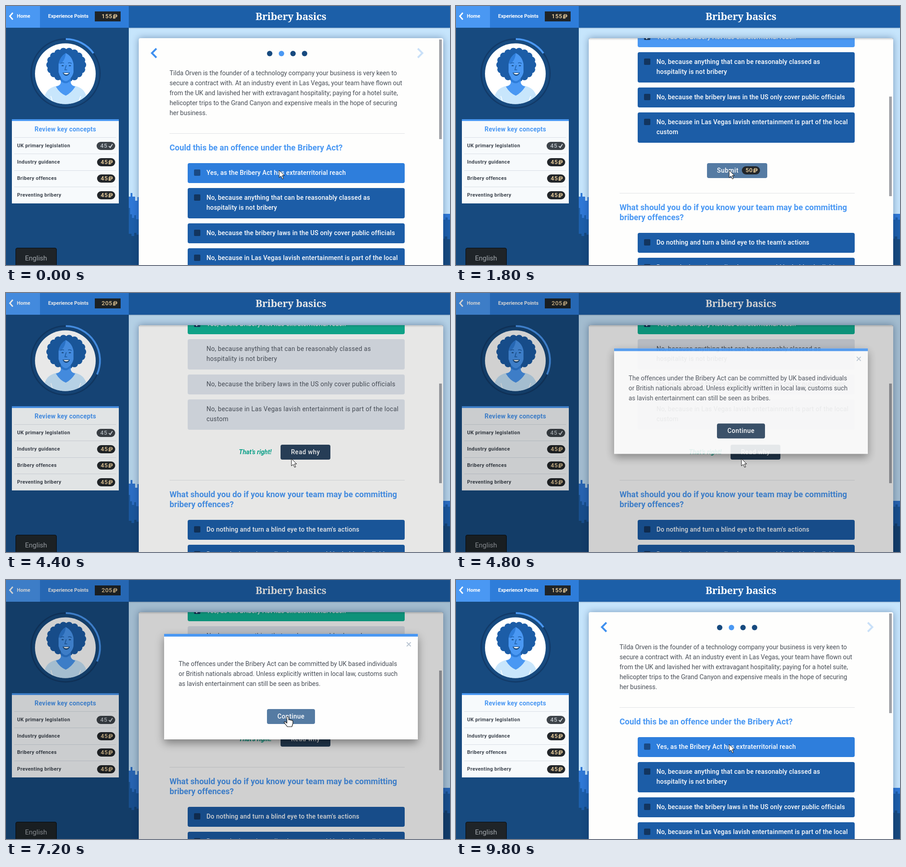
Write an HTML page that moves like this. It is 980x572 px and loops after 10 s.

```html
<!DOCTYPE html>
<html lang="en">
<head>
<meta charset="utf-8">
<title>Bribery basics</title>
<style>
html, body { margin: 0; width: 100%; height: 100%; overflow: hidden; }
#stage { position: relative; width: 980px; height: 572px; overflow: hidden; background: #c6e5fc;
  font: 14px/22px Roboto, sans-serif; color: #484e57; }
#stage div, #stage svg { position: absolute; box-sizing: border-box; }
.t { white-space: pre; }
.b { font-weight: 700; }
.mid { text-align: center; }
.small { font-size: 11px; font-weight: 700; color: #fff; }
.row { font-size: 11px; font-weight: 700; letter-spacing: .35px; color: #3c434d; }
.head { font-size: 18px; font-weight: 700; color: #4a98f3; }
.coin { color: #f8d9a4; font: 500 13px/18px Roboto, sans-serif; letter-spacing: .5px; white-space: pre; }
.pill { width: 40px; height: 18px; border-radius: 9px; background: #22262a; padding-left: 8px; }
#stage .coin svg { position: static; vertical-align: -1px; margin-left: 1px; }
.opt { left: 401px; width: 479px; border-radius: 4px; background: #1c5da7; color: #fff;
  font-weight: 500; letter-spacing: .2px; padding: 10px 0 0 41.5px; white-space: pre; }
.box { left: 14px; top: 14px; width: 14px; height: 14px; border-radius: 2px; background: #12355f; }
.off { font-weight: 400; letter-spacing: .28px; color: #4b525c; }
.off .box { display: none; }
.btn { height: 33px; border-radius: 4px; background: #2a435e; color: #fff;
  font: 500 14px/33px Roboto, sans-serif; letter-spacing: .5px; white-space: pre; }
.line { left: 361px; width: 519px; height: 1px; background: #e0e2e5; }
</style>
</head>
<body>
<div id="stage">
  <svg width="980" height="572">
    <path id="far" fill="#3079d7" d="M271 421h4v-8h4v8h6v9h5v-8h5V572H271zM960 462h5v-3h15V572H960z"/>
    <path id="near" fill="#1d5fab" d="M271 446h3v14h4v8h5v-6h4v9h8V572H271zM960 472h10v-5h5v5h5V572H960z"/>
    <path id="base" fill="#174a7f" d="M271 503h6v5h6v-7h5v4h7V572H271zM960 514h8v-5h6v6h6V572H960z"/>
  </svg>

  <div style="left:293px;top:71px;width:672px;height:520px;border-radius:4px;background:#fefefd;box-shadow:0 0 16px rgba(10,40,90,.42)"></div>
  <div style="left:293px;top:71px;width:672px;height:501px;overflow:hidden">
    <div id="page" style="left:-293px;top:-71px;width:980px;height:1000px">
      <svg id="nav" width="980" height="130" fill="none" stroke-width="4"></svg>
      <div class="line" style="top:281px"></div>
      <div class="line" style="top:713px"></div>
      <div id="submit" class="btn" style="left:554px;top:647px;width:133px;padding-left:22px">Submit</div>
      <div id="reply" style="left:0;top:635px">
        <div class="t b" style="left:514px;top:5px;font-style:italic;color:#0fb096">That’s right!</div>
        <div id="why" class="btn mid" style="left:606px;width:110px">Read why</div>
      </div>
    </div>
    <div id="edge" style="width:672px;height:5px;background:linear-gradient(rgba(40,50,60,.2),transparent)"></div>
    <div id="bar" style="left:663px;top:3px;width:6px;height:220px;background:#a2a4a9"></div>
  </div>

  <div style="left:271px;width:709px;height:48px;background:#1c5fa8;box-shadow:0 1px 2px rgba(0,30,70,.3)"></div>
  <div class="mid" style="left:271px;top:0;width:716px;color:#fff;font:700 22px/45px 'Noto Serif',serif;letter-spacing:-.2px">Bribery basics</div>

  <div id="side" style="width:271px;height:572px;background:#174a7f">
    <div style="width:271px;height:48px;background:#2e7dda"></div>
    <div style="width:75px;height:48px;background:#4a98f3"></div>
    <svg width="20" height="48" fill="none" stroke="#fff" stroke-width="3"><path d="M15 15L8.500 22.500L15 30"/></svg>
    <div style="left:196px;top:12px;width:57px;height:22px;background:#1f2428"></div>
    <div id="points" class="coin" style="left:211px;top:14px"></div>
    <svg id="avatar" width="271" height="240">
      <clipPath id="disc"><circle cx="131" cy="149.500" r="67"/></clipPath>
      <circle cx="131.500" cy="149" r="76" fill="none" stroke="#123a68" stroke-width="3"/>
      <path id="arc" fill="none" stroke="#4a98f3" stroke-width="4"/>
      <circle cx="131" cy="149.500" r="67" fill="#fff"/>
      <g clip-path="url(#disc)">
        <g id="hair" fill="#1c5da7"><ellipse cx="133" cy="129" rx="38" ry="34"/></g>
        <path fill="#c8e6fc" d="M81 222C84 190 92 181 113 176H151C171 181 178 190 182 222z"/>
        <path fill="#4a98f3" d="M121 152V170Q119 176 110 178Q119 193 132 198Q144 192 153 178Q145 176 143 170V152z"/>
        <path fill="#2e7dda" d="M121 158Q132 174 143 158V164Q133 176 121 166z"/>
        <path fill="#4a98f3" d="M132 104Q119 112 116 128V146Q119 160 132 166Q146 161 149 146V128Q146 111 132 104z"/>
        <path fill="#2e7dda" d="M132 104Q119 112 116 128Q130 125 132 104z"/>
        <path fill="none" stroke="#1c5da7" stroke-width="1.500" d="M120 127q4-3 8-1M137 126q4-2 8 1M133 131l-3 10h5"/>
        <path fill="#174a7f" d="M122 132q3-3 6 0q-3 2-6 0zM138 132q3-3 6 0q-3 2-6 0zM125 147h16q-2 7-8 7t-8-7z"/>
        <path fill="#fff" d="M127 148h12q-2 3-6 3t-6-3z"/>
        <path fill="none" stroke="#fff" stroke-width="1.500" d="M99 199l4 13M165 199l-5 13"/>
      </g>
    </svg>
    <div style="left:13px;top:250px;width:236px;height:186px;background:#f7fafc;border-top:4px solid #4a98f3"></div>
    <div style="left:21px;top:534px;width:91px;height:44px;border:1px solid #060a0e;border-radius:4px;background:#1f2428"></div>
  </div>

  <div id="dim" style="width:980px;height:572px;background:#000"></div>
  <div id="modal" style="left:349px;top:119px;width:560px;height:233px;background:#fefefe;box-shadow:0 8px 18px rgba(0,0,0,.4)">
    <div style="width:560px;height:6px;background:#4a98f3"></div>
    <svg width="560" height="40" stroke="#b9c5d2" stroke-width="2"><path d="M535.500 18.500l9 9m0-9l-9 9"/></svg>
    <div class="t" style="left:32px;top:55px">The offences under the Bribery Act can be committed by UK based individuals
or British nationals abroad. Unless explicitly written in local law, customs such
as lavish entertainment can still be seen as bribes.</div>
    <div id="go" class="btn mid" style="left:227px;top:166px;width:106px">Continue</div>
  </div>
  <div id="flyer" class="coin pill"></div>
  <svg id="cursor" width="24" height="28" style="overflow:visible" stroke="#111" stroke-linejoin="round" fill="#fff">
    <path id="arrow" d="M0 0V16L4 12.500L7 19L9.500 18L6.700 11.500H11.500z"/>
    <path id="hand" stroke-width="1.200" d="M0 2q2-3 4 0v6q2-1.500 3.500 .5q2-1 3.300 .7q2.400-.5 2.400 2V16L11 23H1L-6 14q0-3 3-1.500L0 15z"/>
  </svg>
</div>
<script>
const $ = id => document.getElementById(id);
const add = (id, html) => $(id).insertAdjacentHTML('beforeend', html);
const text = (id, x, cy, cls, s) =>
  add(id, `<div class="t ${cls}" style="left:${x}px;top:${cy - 11}px">${s}</div>`);
const coin = n => n + '<svg width="10" height="10" fill="none" stroke="#f8d9a4" stroke-width="1.300">' +
  '<path d="M2.500 10V.8H6a2.800 2.800 0 0 1 0 5.600H0M0 3.600H9M0 8.600H6"/></svg>';

// Side bar
text('side', 24, 23, 'small', 'Home');
text('side', 93, 23, 'small', 'Experience Points');
text('side', 63, 272, 'b', '<span style="color:#4a98f3;letter-spacing:.23px">Review key concepts</span>');
text('side', 42, 557, '', '<span style="color:#a3a8ad;font-size:15px">English</span>');
['UK primary legislation', 'Industry guidance', 'Bribery offences', 'Preventing bribery'].forEach((s, i) => {
  const y = 308.5 + 36.4 * i;
  add('side', `<div style="left:18px;top:${Math.round(y - 18.5)}px;width:225px;height:1px;background:#d8dee5"></div>`);
  text('side', 24.5, y, 'row', s);
  add('side', `<div class="coin pill" style="left:${i ? 201 : 200}px;top:${Math.round(y - 9)}px;` +
    (i ? `">${coin(45)}` : 'width:41px;background:#3d4349;color:#bcc2c8">45<svg width="12" height="10" fill="none" ' +
    'stroke="#d4d9de" stroke-width="2"><path d="M2 5.500l3 3L10 1"/></svg>') + '</div>');
});
for (let i = 0; i < 18; i++) {
  const a = i * Math.PI / 9;
  add('avatar', '');
  $('hair').innerHTML += `<circle cx="${133 + 36 * Math.cos(a)}" cy="${130 + 30 * Math.sin(a)}" r="8"/>`;
}

// Scrolling page
$('nav').innerHTML = '<path stroke="#3f90ef" d="M332 94L322 104L332 114"/><path stroke="#c9e0f8" d="M909 94L919 104L909 114"/>' +
  [582, 608, 633.5, 659].map((x, i) => `<circle cx="${x}" cy="105" r="6" fill="${i == 1 ? '#4a98f3' : '#174a7f'}"/>`).join('');
text('page', 361, 148, '', `Tilda Orven is the founder of a technology company your business is very keen to
secure a contract with. At an industry event in Las Vegas, your team have flown out
from the UK and lavished her with extravagant hospitality; paying for a hotel suite,
helicopter trips to the Grand Canyon and expensive meals in the hope of securing
her business.`);
text('page', 361, 313, 'head', 'Could this be an offence under the Bribery Act?');
text('page', 361, 745, 'head', 'What should you do if you know your team may be committing\nbribery offences?');
[
  [347, 44, 'Yes, as the Bribery Act has extraterritorial reach'],
  [402, 67, 'No, because anything that can be reasonably classed as\nhospitality is not bribery'],
  [480, 44, 'No, because the bribery laws in the US only cover public officials'],
  [535, 67, 'No, because in Las Vegas lavish entertainment is part of the local\ncustom'],
  [801, 44, 'Do nothing and turn a blind eye to the team\'s actions'],
  [856, 67, 'Report the issue immediately, as you could be held to be liable\nfor it']
].forEach(([y, h, s]) =>
  add('page', `<div class="opt" style="top:${y}px;height:${h}px"><div class="box"></div>${s}</div>`));
const opts = [...document.querySelectorAll('.opt')];
opts[0].firstChild.innerHTML = '<svg id="tick" width="14" height="14" fill="none" stroke="#fff" stroke-width="2"><path d="M3 7.500l3 3.500L11 2.500"/></svg>';
add('submit', `<div class="coin pill" style="left:77px;top:7px">${coin(50)}</div>`);
$('flyer').innerHTML = coin(50);

function render(t) {
  const ramp = (a, b) => Math.min(1, Math.max(0, (t - a) / (b - a)));
  const within = (a, b) => t >= a && t < b;
  const show = (id, on) => $(id).style.display = on ? '' : 'none';
  const move = (id, x, y) => $(id).style.transform = `translate(${x}px,${y}px)`;
  const fill = (id, c) => $(id).style.background = c;
  const live = t < 9800, done = within(3000, 9800);

  const scroll = !live || t < 1200 ? 0 : t < 1400 ? 139 : t < 1600 ? 240 : 300;
  move('page', 0, -scroll);
  move('bar', 0, scroll * .42);
  show('edge', scroll == 300);

  // Answers
  const picked = live && t >= 200;
  show('tick', picked);
  opts[0].style.background = done ? '#10b294' : !picked ? '#2e7edc' : t < 400 ? '#3c8be8' : '#4a98f3';
  opts[0].firstChild.style.opacity = picked ? 1 : .7;
  opts.slice(1, 4).forEach(o => {
    o.classList.toggle('off', done);
    o.style.background = done ? (t < 3200 ? '#d2daea' : '#dfe4ec') : '';
  });
  show('submit', !done);
  fill('submit', within(1800, 3000) ? '#557ba3' : '#2d4863');
  show('reply', done);
  const q = ramp(3000, 3600);
  move('reply', 0, -33 * (1 - q));
  $('reply').style.opacity = .25 + .75 * q;
  fill('why', within(4200, 4400) ? '#557ba3' : '#2a435e');

  // Points
  const f = .4 + .4 * ramp(3000, 3200);
  show('flyer', within(3000, 3400));
  move('flyer', 631 - 427 * f, 354 - 337 * f);
  $('flyer').style.opacity = 1 - .8 * f;
  const k = live ? ramp(3200, 3800) : 0;
  $('points').innerHTML = coin(Math.round(155 + 50 * k));
  const a = (54 + 60 * k) * Math.PI / 180;
  $('arc').setAttribute('d', `M132 73A76 76 0 0 1 ${131.5 + 76 * Math.sin(a)} ${149 - 76 * Math.cos(a)}`);

  // Dialog
  const m = (1 - (1 - ramp(4400, 5000)) ** 2) * (1 - ramp(7200, 7800));
  $('dim').style.opacity = .18 * ramp(4200, 4600) * (1 - ramp(7400, 8000));
  $('modal').style.opacity = m;
  move('modal', 0, 30 * (1 - m));
  fill('go', t >= 6000 ? '#557ba3' : '#2a435e');

  // Pointer
  const c = ramp(4000, 4400), d = ramp(5200, 6200);
  show('cursor', t < 7800 || !live);
  show('hand', live && t >= 6000);
  show('arrow', !live || t < 6000);
  if (live) move('cursor', 603 + 27 * c - 10 * d, 363 + 3 * c - 65 * d);
  else move('cursor', 603, 363);

  // Skyline
  const up = within(8400, 9800) ? 1 : 0;
  move('far', 0, -3 * up);
  move('near', 0, -6 * up);
  move('base', 0, -7 * up);
}

const start = performance.now();
(function loop() {
  render(Math.floor((performance.now() - start) % 10000 / 200) * 200);
  requestAnimationFrame(loop);
})();
</script>
</body>
</html>
```
